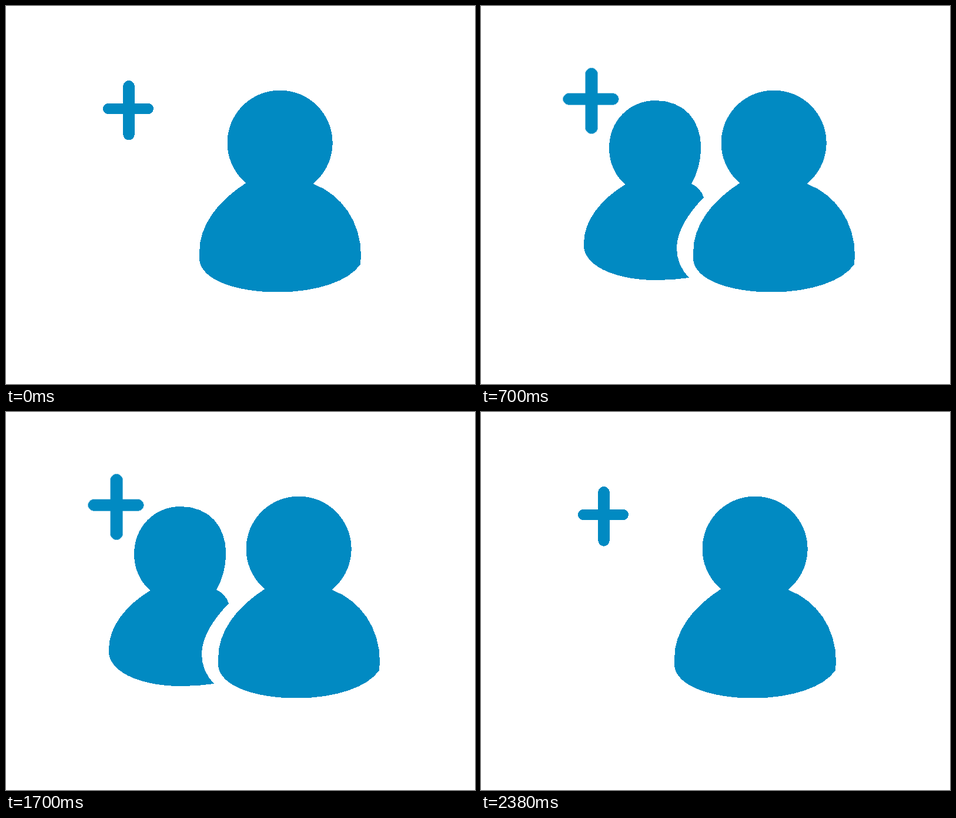
Animation, 798 px wide and 644 px high, one loop 2.4 s. Source, as an HTML page without scripts:

```html
<!DOCTYPE html>
<html lang="en">
<head>
<meta charset="utf-8">
<title>Add user</title>
<style>
  html, body { margin: 0; width: 100%; height: 100%; overflow: hidden; background: #fff; }
  svg { display: block; width: 100%; height: 100%; fill: #018ac2; shape-rendering: crispEdges; }

  .plus, .front, .back { animation: 2.4s cubic-bezier(.333, 0, .667, 1) infinite; }
  .plus { transform-origin: 208px 178px; animation-name: drift; }
  .front { transform-origin: 466px 316px; animation-name: step-aside; }
  .back { transform-origin: 277px 316px; animation-name: swell; }
  .reveal { animation: reveal 2.4s step-end infinite; }

  @keyframes drift {
    0%, 100% { transform: none; }
    50% { transform: translate(-33.8px, -25.9px) scale(1.165); }
  }
  /* slide right, then grow at the turning point */
  @keyframes step-aside {
    0%, 100% { transform: translate(0, 0) scale(1); }
    33.333%, 66.667% { transform: translate(33.5px, 0) scale(1); }
    50% { transform: translate(38.6px, 0) scale(1.043); }
  }
  @keyframes swell {
    0%, 33.333%, 66.667%, 100% { transform: translate(0, 0) scale(1); }
    50% { transform: translate(3.7px, 0) scale(1.053); }
  }
  @keyframes reveal {
    0%, 79.167% { visibility: hidden; }
    20.833% { visibility: visible; }
  }
</style>
</head>
<body>
<svg viewBox="0 0 798 644">
  <g class="plus">
    <rect x="199.2" y="127" width="19.6" height="101.6" rx="9.8"/>
    <rect x="165" y="166" width="86" height="18" rx="9"/>
  </g>
  <g class="reveal">
    <path class="back" d="M245.5 304C227 288 218 266 218 242C218 196 252 161 297 161C346 161 374.3 195 374.3 241
      C374.3 263 368 286 358 303C368 307 376 316 379 326C352 354 333 384 333 413C333 432 341 450 354 463
      C335 466 316 467 297 467C234 467 180 446 175 412V404C175 366 203 330 245.5 304Z"/>
  </g>
  <g class="front">
    <circle cx="466.1" cy="233.2" r="89.6"/>
    <path d="M407.5 302C360 333 329 373 329 420V432C332 467 392 487.5 463 487.5
      C527 487.5 584 469 603 440L604 425C604 368 571 321 522.5 303Z"/>
  </g>
</svg>
</body>
</html>
```
